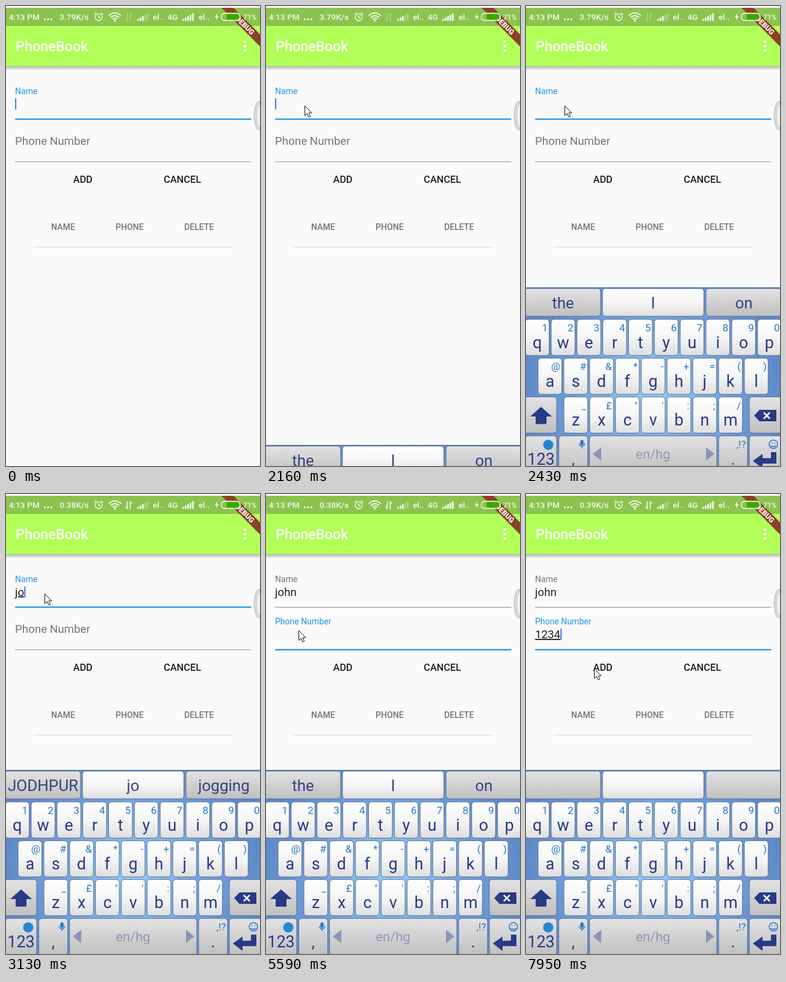
An HTML page for the animation above (8 s loop, 422x762 px).

```html
<!DOCTYPE html>
<html lang="en">
<head>
<meta charset="utf-8">
<title>Phone book</title>
<style>
  html, body { margin: 0; width: 100%; height: 100%; overflow: hidden; background: #fafafa; }
  svg { display: block; font-family: Roboto, sans-serif; }
  text { white-space: pre; }
  .status text { font-size: 13.7px; font-weight: 500; fill: #f3f9ea; }
  .medium { font-weight: 500; }
  .button { font-size: 16.4px; fill: #212121; }
  .head { font-size: 14.07px; fill: #757575; }
  .value { font-size: 18.75px; fill: #212121; }
  .label { font-size: 18.75px; }
  .composing { text-decoration: underline; }
  .letter { font-size: 27px; fill: #283985; text-anchor: middle; }
  .hint { font-size: 17px; fill: #2577cb; text-anchor: end; }
  .word { font-size: 26px; fill: #35437f; text-anchor: middle; }
  .key { stroke: #526b98; stroke-width: 1; }
</style>
</head>
<body>
<svg width="422" height="762" viewBox="0 0 422 762">
  <defs>
    <linearGradient id="shade" x2="0" y2="1">
      <stop stop-color="#000" stop-opacity=".3"/><stop offset="1" stop-color="#000" stop-opacity="0"/>
    </linearGradient>
    <linearGradient id="light" x2="0" y2="1">
      <stop stop-color="#fff"/><stop offset=".5" stop-color="#f6f6f6"/><stop offset="1" stop-color="#dedede"/>
    </linearGradient>
    <linearGradient id="dark" x2="0" y2="1">
      <stop stop-color="#e3e3e3"/><stop offset="1" stop-color="#bfbfbf"/>
    </linearGradient>
    <radialGradient id="sky" gradientUnits="userSpaceOnUse" cx="211" cy="630" r="225">
      <stop stop-color="#92cdf7"/><stop offset=".6" stop-color="#6f9fd8"/><stop offset="1" stop-color="#5d87c6"/>
    </radialGradient>
  </defs>

  <rect width="422" height="762" fill="#fafafa"/>
  <rect y="99" width="422" height="8" fill="url(#shade)"/>
  <rect y="33" width="422" height="66.5" fill="#b2ff59"/>
  <rect y="3" width="422" height="30" fill="#8bc34e"/>
  <text class="medium" x="16" y="75" font-size="23.4" fill="#fff">PhoneBook</text>
  <g fill="#fff">
    <circle cx="396.7" cy="59" r="2.4"/><circle cx="396.7" cy="66.4" r="2.4"/><circle cx="396.7" cy="73.8" r="2.4"/>
  </g>
  <path d="M358 3H378L422 47V67Z" fill="#8b4126"/>
  <text transform="translate(397 32) rotate(45)" y="4.2" text-anchor="middle" font-size="12" font-weight="900" fill="#fff">DEBUG</text>

  <g class="status" fill="none" stroke="#f3f9ea" stroke-width="1.4">
    <g stroke="none">
      <text x="4.5" y="23">4:13 PM</text>
      <text id="speed" x="89" y="23"></text>
      <text x="244" y="23">el..</text>
      <text x="268.5" y="23">4G</text>
      <text x="320" y="23">el..</text>
      <text x="394" y="22.5" style="font-size:12px">71%</text>
      <g fill="#f3f9ea">
        <circle cx="64.5" cy="22" r="1.7"/><circle cx="70" cy="22" r="1.7"/><circle cx="75.5" cy="22" r="1.7"/>
        <path d="M351 12L347 19H350L348.500 24.500L353.500 17H350.500Z"/>
        <g id="bars"></g>
      </g>
    </g>
    <circle cx="154" cy="18.5" r="5.8"/>
    <path d="M154 15V18.500L157 20M147 14L150 11M158 11L161 14"/>
    <path d="M171 16Q181 7 191 16M174 19Q181 13 188 19M177 22Q181 18.500 185 22" stroke-width="2"/>
    <circle cx="181" cy="24" r="1" fill="#f3f9ea"/>
    <path id="arrows" d="M201.500 12V24L198.500 21M206.500 25V13L209.500 16" stroke-width="1.7"/>
    <rect x="357.5" y="12" width="32" height="12" rx="6" fill="#8bc34e"/>
    <path d="M369 13.500H383A4.500 4.500 0 0 1 383 22.500H369A2.500 2.500 0 0 1 366.500 20V16A2.500 2.500 0 0 1 369 13.500Z" fill="#38a800" stroke="none"/>
  </g>

  <rect id="nameLine" x="15" width="392.500"/>
  <rect id="phoneLine" x="15" width="392.500"/>
  <text id="nameLabel" class="label" transform="translate(15 146) scale(.75)">Name</text>
  <text id="phoneLabel" class="label">Phone Number</text>
  <text id="name" class="value" x="15" y="168.5"></text>
  <text id="phone" class="value" x="15" y="239"></text>
  <rect id="caret" width="2.2" height="18.500" fill="#4285e8"/>

  <text class="medium button" x="111.500" y="292.500">ADD</text>
  <text class="medium button" x="262" y="292.500">CANCEL</text>
  <text class="medium head" x="75" y="371">NAME</text>
  <text class="medium head" x="182" y="371">PHONE</text>
  <text class="medium head" x="296" y="371">DELETE</text>
  <rect x="46" y="398.700" width="330" height="1.200" fill="#dcdcdc"/>

  <path d="M422 158H419C410 165 410 199 419 205.500H422Z" fill="#d9d9d9" stroke="#b9b9b9"/>
  <path d="M423 163C417 172 417 192 423 201" fill="#eee" stroke="#fff" stroke-width="1.500"/>

  <g id="keyboard">
    <rect y="457" width="422" height="306" fill="url(#sky)"/>
    <rect y="457" width="422" height="1.200" fill="#4c78b5"/>
    <g id="keys"></g>
    <g fill="#283985">
      <path d="M25 655L43 671H34V683.500H16V671H7Z"/>
      <path d="M379 669.500L388 660H416V679H388Z"/>
      <path d="M416 730V749H393V757L377 744.500L393 733V740H407V730Z"/>
    </g>
    <path d="M395 664.500L405 674.500M405 664.500L395 674.500" stroke="#fff" stroke-width="2.500"/>
    <circle cx="37" cy="718" r="8.500" fill="#2686d1"/>
    <g fill="none" stroke="#2577cb" stroke-width="1.500">
      <rect x="91" y="710.500" width="4" height="7.500" rx="2" fill="#2577cb"/>
      <path d="M88.500 715.500Q89 720.500 93 720.500T97.500 715.500M93 720.500V724"/>
      <circle cx="411" cy="717" r="7"/>
      <path d="M407 719Q411 723.500 415 719M408.500 714V715.500M413.500 714V715.500"/>
    </g>
    <path d="M125 722V744L111 733ZM299 722V744L313 733Z" fill="#8995b3"/>
    <text x="211" y="741" font-size="22" text-anchor="middle" fill="#8d98b5">en/hg</text>
  </g>

  <path id="mouse" d="M.5 .5V16.500L4.300 13L7 19L9.700 17.800L7.100 12H12Z" fill="#fff" stroke="#111" stroke-width="1"/>
</svg>

<script>
const LOOP = 8000, BLUE = [33, 150, 235], GREY = [117, 117, 117];
const $ = id => document.getElementById(id);

function add(parent, tag, attrs, content = '') {
  const node = document.createElementNS('http://www.w3.org/2000/svg', tag);
  for (const name in attrs) node.setAttribute(name, attrs[name]);
  node.textContent = content;
  return parent.appendChild(node);
}
function set(node, attrs) {
  for (const name in attrs) node.setAttribute(name, attrs[name]);
}

// Status bar signal bars
[[218, 2], [293, 5]].forEach(([x, strong]) => {
  for (let i = 0; i < 5; i++) {
    const h = 3 + i * 2.3;
    add($('bars'), 'rect', { x: x + i * 4, y: 24.500 - h, width: 3, height: h, opacity: i <= strong ? .95 : .3 });
  }
});

// Keyboard
const PITCH = 42.85;
function key(x, y, width, height, fill, letter = '', hint = '') {
  add($('keys'), 'rect', { class: 'key', x, y, width, height, rx: 5, fill: `url(#${fill})` });
  add($('keys'), 'text', { class: 'letter', x: x + width / 2, y: y + 47.500 }, letter);
  add($('keys'), 'text', { class: 'hint', x: x + width - 2.500, y: y + 20 }, hint);
}
[['qwertyuiop', '1234567890', -1, 510],
 ['asdfghjkl', '@#&*-+=()', 20, 574.300],
 ['zxcvbnm', '_£"\':;/', 63, 638.600]].forEach(([letters, hints, x, y]) =>
  [...letters].forEach((letter, i) => key(x + i * PITCH, y, 39.500, 60, 'light', letter, hints[i])));
key(-3, 638.600, 54, 60, 'dark');
key(371, 638.600, 54, 60, 'dark');
key(-1, 703, 52, 62, 'dark', '123');
key(54.500, 703, 48, 62, 'dark', ',');
key(105.500, 703, 211.500, 62, 'dark');
key(320, 703, 48, 62, 'dark', '.', ',!?');
key(371, 703, 54, 62, 'dark');
const words = [[-3, 127, 'dark', 61.500], [127, 168.500, 'light', 211], [299, 127, 'dark', 362]].map(([x, width, fill, mid]) => {
  key(x, 459, width, 46, fill);
  return add($('keys'), 'text', { class: 'word', x: mid, y: 492 });
});

// Timelines: [start in ms, value]
const FOCUS_PHONE = 5090;
const nameText = [[0, ''], [2830, 'j'], [3060, 'jo'], [3240, 'joh'], [3420, 'john']];
const phoneText = [[0, ''], [5870, '1'], [6010, '12'], [6150, '123'], [6290, '1234']];
const speeds = [[0, '3.79K/s'], [2680, '0.38K/s'], [6670, '0.39K/s']];
const suggestions = [[0, 'the I on'], [2900, 'just j job'], [3130, 'JODHPUR jo jogging'],
  [3310, 'join joh john'], [3600, 'johns john join'], [5300, 'the I on'], [5940, '']];
const blinkStarts = [[0, -160], ...[2830, 3060, 3240, 3420, FOCUS_PHONE, 5870, 6010, 6150, 6290, 7560].map(t => [t, t])];
const mousePath = [[700, 330, 770], [1000, 70, 164], [1255, 70, 164], [1330, 74, 165], [1450, 64, 165],
  [4350, 64, 165], [4550, 54, 226], [7140, 54, 226], [7950, 113, 288.500]];

const at = (list, t) => list.filter(step => step[0] <= t).pop()[1];
const progress = (t, from, to) => Math.min(1, Math.max(0, (t - from) / (to - from)));
const smooth = p => p * p * (3 - 2 * p);
const mix = (a, b, p) => a + (b - a) * p;
const blend = (a, b, p) => `rgb(${a.map((v, i) => Math.round(mix(v, b[i], p)))})`;

function mouseAt(t) {
  const i = mousePath.findIndex(point => point[0] > t);
  if (i < 0) return mousePath[mousePath.length - 1].slice(1);
  if (!i) return [-50, -50];
  const [t0, x0, y0] = mousePath[i - 1], [t1, x1, y1] = mousePath[i];
  const p = smooth(progress(t, t0, t1));
  return [mix(x0, x1, p), mix(y0, y1, p)];
}

function drawLine(node, y, active) {
  set(node, { y: y - (active ? 1.200 : .5), height: active ? 2.300 : 1.100, fill: active ? '#2196eb' : '#929292' });
}

function render(t) {
  const onPhone = t >= FOCUS_PHONE;
  const p = smooth(progress(t, FOCUS_PHONE, FOCUS_PHONE + 200));

  $('speed').textContent = at(speeds, t);
  set($('arrows'), { opacity: t < 2680 ? .35 : 1 });

  $('name').textContent = at(nameText, t);
  $('phone').textContent = at(phoneText, t);
  $('name').classList.toggle('composing', !onPhone);
  $('phone').classList.toggle('composing', onPhone);
  set($('nameLabel'), { fill: blend(BLUE, GREY, p) });
  set($('phoneLabel'), {
    fill: blend(GREY, BLUE, p),
    transform: `translate(15 ${mix(229.500, 216, p)}) scale(${mix(1, .75, p)})`
  });
  drawLine($('nameLine'), 187.500, !onPhone);
  drawLine($('phoneLine'), 258, onPhone);

  const field = onPhone ? $('phone') : $('name');
  const blink = Math.floor((t - at(blinkStarts, t)) / 500) % 2;
  const width = field.textContent ? field.getComputedTextLength() : 0;
  set($('caret'), { x: 15 + width, y: onPhone ? 223 : 153, opacity: blink ? 0 : 1 });

  const rise = 1 - (1 - progress(t, 2140, 2490)) ** 2;
  set($('keyboard'), { transform: `translate(0 ${Math.round(306 * (1 - rise))})` });
  const shown = at(suggestions, t).split(' ');
  words.forEach((word, i) => word.textContent = shown[i] || '');

  set($('mouse'), { transform: `translate(${mouseAt(t).map(Math.round)})` });
}

const start = performance.now();
function tick() {
  render((performance.now() - start) % LOOP);
  requestAnimationFrame(tick);
}
tick();
</script>
</body>
</html>
```
